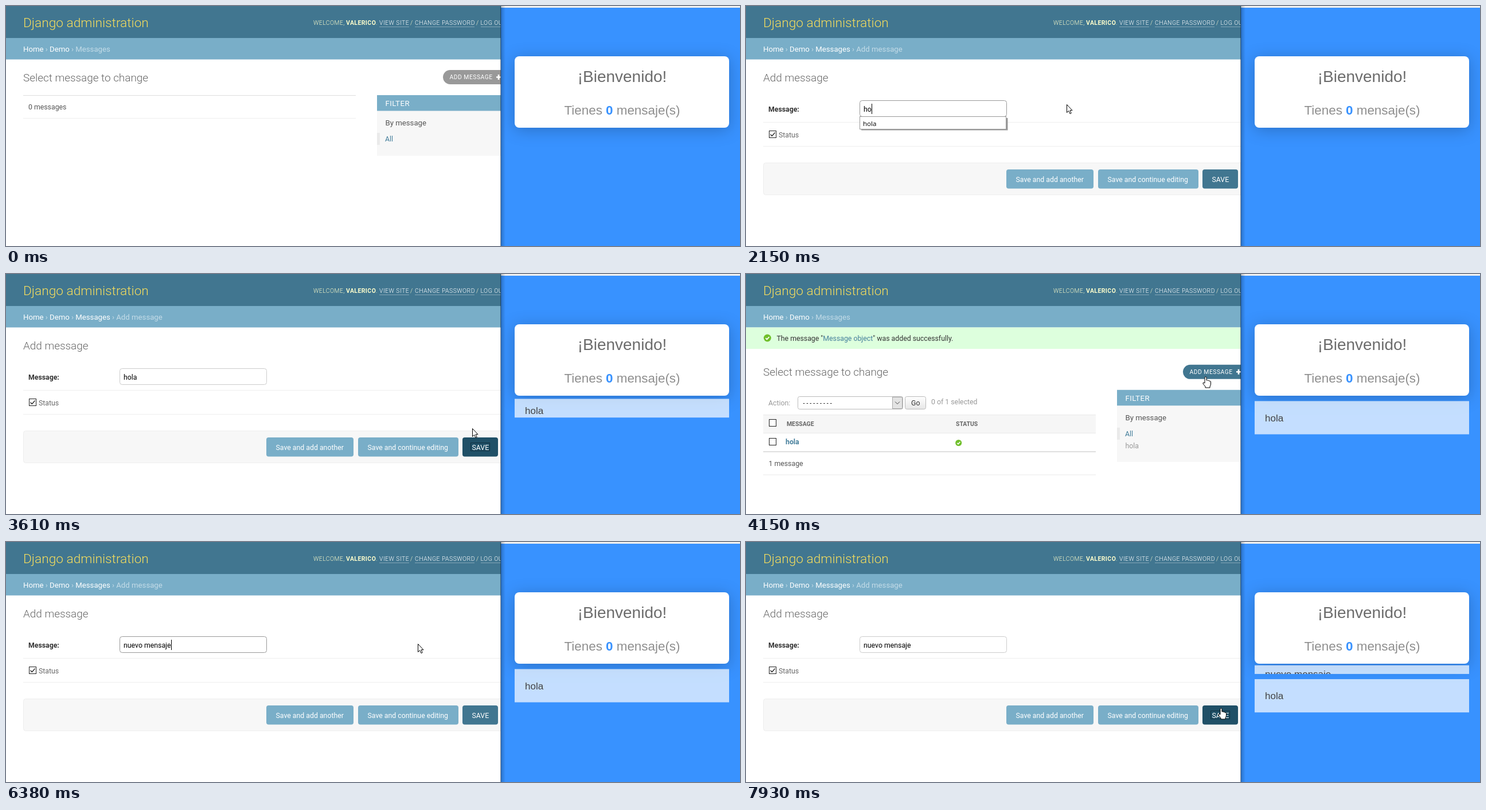
Write an HTML page that moves like this. It is 1280x420 px and loops after 8 s.

```html
<!DOCTYPE html>
<html lang="en">
<head>
<meta charset="utf-8">
<title>Admin and live messages</title>
<style>
  html, body { margin: 0; height: 100%; overflow: hidden; background: #fff; }
  #stage { display: block; width: 100vw; height: 100vh; }
  text { font: 12.3px Roboto, sans-serif; fill: #666; white-space: pre; }
  .brand { font-size: 22.7px; font-weight: 300; fill: #f5dd5d; }
  .tools text { font-size: 10.4px; font-weight: 300; letter-spacing: .47px; fill: #fff; }
  .tools .pale { fill: #ffc; }
  .tools .name { font-weight: 700; }
  .crumbs { font-size: 13.2px; fill: #c4dce8; }
  .crumbs .link, .white { fill: #fff; }
  .title { font-size: 18.9px; font-weight: 300; }
  .small { font-size: 10.4px; }
  .spaced { letter-spacing: .47px; }
  .medium { font-size: 13.2px; }
  .bold { font-weight: 700; }
  .dark { fill: #333; }
  .grey { fill: #999; }
  .blue { fill: #447e9b; }
  .black { fill: #000; }
  .panel text { font-family: "Liberation Sans", Arial, sans-serif; }
  #suggestion { font: 11.6px "Open Sans", sans-serif; }
  .box { fill: #fff; stroke: #222; }
  .pointer { fill: #fff; stroke: #000; stroke-linejoin: round; }
</style>
</head>
<body>
<svg id="stage" viewBox="0 0 1280 420" preserveAspectRatio="none">
  <defs>
    <linearGradient id="edge">
      <stop offset="0" stop-color="#012" stop-opacity=".5"/>
      <stop offset=".3" stop-color="#012" stop-opacity=".2"/>
      <stop offset="1" stop-color="#012" stop-opacity="0"/>
    </linearGradient>
    <linearGradient id="bevel" x2="0" y2="1">
      <stop stop-color="#fff"/><stop offset="1" stop-color="#e6e6e6"/>
    </linearGradient>
    <g id="ok">
      <circle r="6.5" fill="#70bf2b"/>
      <path d="M-3 .2L-.8 2.4L3.2 -2" fill="none" stroke="#fff" stroke-width="1.8"/>
    </g>
  </defs>

  <rect width="1280" height="420" fill="#fff"/>
  <rect width="863" height="56" fill="#417690"/>
  <rect y="56" width="863" height="37.5" fill="#79aec8"/>
  <text class="brand" x="30" y="36.5">Django administration</text>
  <g class="tools">
    <text class="pale" x="536" y="32.5">WELCOME,</text>
    <text class="pale name" x="593" y="32.5">VALERICO</text>
    <text class="pale" x="645" y="32.5">.</text>
    <text x="651" y="32.5">VIEW SITE</text>
    <text class="pale" x="705" y="32.5">/</text>
    <text x="713" y="32.5">CHANGE PASSWORD</text>
    <text class="pale" x="820" y="32.5">/</text>
    <text x="827.5" y="32.5">LOG OUT</text>
    <path d="M651 36.5H703M713 36.5H817M828 36.5H863" stroke="#fff" stroke-opacity=".35"/>
  </g>
  <text class="crumbs" x="30" y="79.5"><tspan class="link">Home</tspan> › <tspan class="link">Demo</tspan> › <tspan id="crumb">Messages</tspan><tspan id="leaf"> › Add message</tspan></text>

  <g id="list">
    <g id="shifted">
      <text class="title" x="30" y="131.5">Select message to change</text>
      <rect id="add" x="762" y="112" width="120" height="25" rx="12.5"/>
      <text class="small spaced white" x="773.5" y="128.3">ADD MESSAGE</text>
      <path d="M855 124.5H864M859 120V129" stroke="#fff" stroke-width="2.6"/>
      <rect id="filterBody" x="647" y="156" width="220" fill="#f7f7f7"/>
      <rect x="647" y="156" width="220" height="27.5" fill="#79aec8"/>
      <text class="medium spaced white" x="661.5" y="175">FILTER</text>
      <text class="medium" x="661.5" y="209" style="fill:#555">By message</text>
      <rect x="647" y="222" width="5" height="21" fill="#eaeaea"/>
      <text class="blue" x="661" y="237.3">All</text>
    </g>
    <g id="empty">
      <path d="M30 156.5H610" stroke="#ddd"/>
      <path d="M30 196.5H610" stroke="#eee"/>
      <text x="39" y="181" style="fill:#555">0 messages</text>
    </g>
    <g id="filled">
      <rect y="93.5" width="863" height="37.5" fill="#dfd"/>
      <use href="#ok" x="37.3" y="112"/>
      <text class="dark" x="53.5" y="116.5">The message "<tspan class="blue">Message object</tspan>" was added successfully.</text>
      <text class="grey" x="661.5" y="305">hola</text>
      <text class="grey" x="39" y="230">Action:</text>
      <rect x="90.5" y="214.5" width="183" height="22" rx="3" fill="#fff" stroke="#bbb"/>
      <text class="black" x="98" y="229" style="font:9.8px 'DejaVu Sans Mono',monospace">---------</text>
      <rect x="255.5" y="215.5" width="17" height="20" fill="#e3e3e3" stroke="#aaa"/>
      <path d="M260 223.5L264 227.5L268 223.5" fill="none" stroke="#444"/>
      <rect x="277.5" y="214.5" width="36" height="22" rx="3" fill="url(#bevel)" stroke="#bbb"/>
      <text class="dark" x="288" y="230">Go</text>
      <text class="grey" x="323" y="228.3">0 of 1 selected</text>
      <rect x="30" y="246" width="580" height="32" fill="#f6f6f6"/>
      <path d="M30 246.5H610M30 278.5H610M30 351.5H610" stroke="#eaeaea"/>
      <path d="M30 311H610" stroke="#d4d4d4" stroke-width="1.5"/>
      <rect class="box" x="40.5" y="254.5" width="12" height="12"/>
      <rect class="box" x="40.5" y="287.5" width="12" height="12"/>
      <text class="small bold" x="71" y="266">MESSAGE</text>
      <text class="small bold" x="366" y="266">STATUS</text>
      <text class="bold blue" x="69" y="298.3">hola</text>
      <use href="#ok" transform="translate(370.7 295.5) scale(.85)"/>
      <text x="39.5" y="336.3" style="fill:#555">1 message</text>
    </g>
  </g>

  <g id="form">
    <text class="title" x="30" y="131.5">Add message</text>
    <path d="M30 203.5H863M30 245.5H863" stroke="#eee"/>
    <text class="bold dark" x="39" y="184.5">Message:</text>
    <rect id="field" x="198.5" y="165.5" width="256" height="28" rx="4" fill="#fff"/>
    <text class="black" id="typed" x="205" y="184.5"></text>
    <rect id="caret" y="171" width="1" height="18"/>
    <rect class="box" x="40.5" y="218.5" width="12" height="12"/>
    <path d="M42.5 224.5L45.3 227.5L50.5 221.5" fill="none" stroke="#222" stroke-width="1.3"/>
    <text x="57" y="230">Status</text>
    <rect x="30.5" y="274.5" width="850" height="56" rx="4" fill="#f7f7f7" stroke="#eee"/>
    <rect x="454" y="286" width="152" height="33.5" rx="4" fill="#79aec8"/>
    <rect x="614" y="286" width="175" height="33.5" rx="4" fill="#79aec8"/>
    <rect id="save" x="796" y="286" width="62" height="33.5" rx="4"/>
    <text class="white" x="470.5" y="307.5">Save and add another</text>
    <text class="white" x="630.5" y="307.5">Save and continue editing</text>
    <text class="white" x="812.5" y="307.5">SAVE</text>
    <rect id="focusRing" x="810.5" y="295.5" width="33" height="14" fill="none" stroke="#06121a" stroke-dasharray="1"/>
    <g id="dropdown">
      <rect x="201" y="196" width="255.5" height="21.5" fill="#999"/>
      <rect x="198.5" y="193.5" width="255" height="22" fill="#fff" stroke="#999"/>
      <rect id="highlight" x="199" y="194" width="254" height="21" fill="#0078d7"/>
      <text id="suggestion" x="204" y="209.8"></text>
    </g>
  </g>

  <g class="panel">
    <rect x="863" width="417" height="420" fill="#3892ff"/>
    <rect x="887" y="88" width="374" height="125" rx="8" fill="#fff" style="filter:drop-shadow(0 4px 14px rgba(0,0,0,.22))"/>
    <text x="1074.5" y="133" text-anchor="middle" style="font-size:28px;fill:#6c6c6c">¡Bienvenido!</text>
    <text x="1074.5" y="189.5" text-anchor="middle" style="font-size:22.4px;fill:#8e8e8e">Tienes <tspan class="bold" style="fill:#3892ff">0</tspan> mensaje(s)</text>
    <g id="cards"></g>
    <rect x="863" width="417" height="3" fill="#f0f0f0"/>
    <rect x="862" width="9" height="420" fill="url(#edge)"/>
  </g>

  <path id="arrow" class="pointer" d="M.5 .5V14.5L3.7 11.5L6 16.6L8.2 15.6L6 10.7H10Z"/>
  <path id="hand" class="pointer" d="M-2 11V1.5Q-2 0 -.5 0T1 1.5V6Q2.5 5.3 3.5 6.5Q5 6 6 7.2Q8.5 7 8.5 9V13Q8 15 7 17V19H-1V17L-5 12Q-5.5 10 -4 10Z"/>
</svg>
<script>
const LOOP = 8000;
const TICK = 77;
const $ = id => document.getElementById(id);
const show = (id, on) => $(id).setAttribute('visibility', on ? 'inherit' : 'hidden');
const set = (el, attrs) => { for (const k in attrs) el.setAttribute(k, attrs[k]); };
const within = (t, ...ranges) => ranges.some(([a, b]) => t >= a && t < b);
const latest = (list, t) => list.filter(([at]) => at <= t).pop()[1];

const pages = [[0, 'empty'], [1240, 'form'], [3770, 'filled'], [4530, 'form']];
const typing = [
  [0, ''], [2070, 'h'], [2150, 'ho'], [2300, 'hol'], [2470, 'hola'],
  [4530, ''], [5070, 'n'], [5230, 'nu'], [5310, 'nue'], [5460, 'nuev'], [6380, 'nuevo mensaje']
];
const path = [ // time, x, y of the pointer tip
  [200, 1088, 424], [1000, 805, 126], [1240, 805, 126], [1610, 559, 172],
  [2550, 559, 172], [3150, 813, 298], [3400, 813, 298], [3610, 813, 270],
  [4140, 802, 180], [4530, 802, 180], [4610, 718, 178], [6770, 718, 178],
  [7240, 868, 284], [7540, 829, 291], [LOOP, 829, 291]
];

// Newest card first
const cards = [['nuevo mensaje', 7794], ['hola', 3402]].map(([label, start]) => {
  const make = (parent, tag, attrs) => {
    const el = document.createElementNS('http://www.w3.org/2000/svg', tag);
    set(el, attrs);
    return parent.appendChild(el);
  };
  const box = make($('cards'), 'svg', { x: 887, width: 374, overflow: 'hidden' });
  make(box, 'rect', { width: '100%', height: '100%', fill: '#fff', 'fill-opacity': .7 });
  const text = make(box, 'text', { x: 18, style: 'font-size:17px;fill:#444' });
  text.textContent = label;
  return { box, text, start };
});

function pointerAt(t) {
  const i = Math.max(1, path.findIndex(([at]) => at > t));
  const [t0, x0, y0] = path[i - 1], [t1, x1, y1] = path[i];
  const u = Math.min(1, Math.max(0, (t - t0) / (t1 - t0)));
  const e = u * u * (3 - 2 * u);
  return [x0 + (x1 - x0) * e, y0 + (y1 - y0) * e];
}

function drawCards(t) {
  let y = 213.2;
  for (const { box, text, start } of cards) {
    const u = Math.min(1, Math.max(0, (t - start) / 400));
    const p = .5 - Math.cos(Math.PI * u) / 2;
    const height = 58.5 * p;
    y += 9 * p;
    set(box, { y, height, visibility: p ? 'visible' : 'hidden' });
    set(text, { y: 16 + 19.5 * p });
    y += height;
  }
}

function draw(t) {
  const tick = Math.floor((t + 16) / TICK) * TICK;
  const page = latest(pages, t);
  const isForm = page === 'form', isFilled = page === 'filled';
  const shift = isFilled ? 46.8 : 0;
  const [x, y] = pointerAt(tick);
  const onAdd = !isForm && x > 764 && x < 863 && y > 112 + shift && y < 137 + shift;
  const onSave = isForm && x > 796 && x < 858 && y > 286 && y < 319;
  const saveFocused = within(t, [3300, 3770], [7540, LOOP]);

  show('list', !isForm);
  show('form', isForm);
  show('empty', page === 'empty');
  show('filled', isFilled);
  show('leaf', isForm);
  set($('crumb'), { class: isForm ? 'link' : '' });
  set($('shifted'), { transform: `translate(0 ${shift})` });
  set($('filterBody'), { height: isFilled ? 126 : 106 });
  set($('add'), { fill: onAdd ? '#417690' : '#999' });

  $('typed').textContent = latest(typing, t);
  set($('field'), { stroke: saveFocused ? '#ccc' : '#999' });
  set($('caret'), { x: Math.round(205 + $('typed').getComputedTextLength()) });
  show('caret', isForm && within(t, [1240, 1760], [2070, 3300], [4530, 6000], [6380, 6910], [7440, 7540]));

  const highlighted = within(t, [5920, 6380]);
  show('dropdown', isForm && within(t, [2070, 2620], [5150, 6380]));
  show('highlight', highlighted);
  $('suggestion').textContent = t < 4000 ? 'hola' : 'nuevo mensaje';
  $('suggestion').style.fill = highlighted ? '#fff' : '#000';

  set($('save'), { fill: saveFocused || (onSave && t > 4000) ? '#205067' : '#417690' });
  show('focusRing', saveFocused);

  drawCards(tick);

  const pressing = onAdd || onSave;
  for (const id of ['arrow', 'hand']) {
    set($(id), { transform: `translate(${Math.round(x)} ${Math.round(y)})` });
    show(id, t >= 230 && pressing === (id === 'hand'));
  }
}

const begin = performance.now();
function frame() {
  draw((performance.now() - begin) % LOOP);
  requestAnimationFrame(frame);
}
frame();
</script>
</body>
</html>
```
